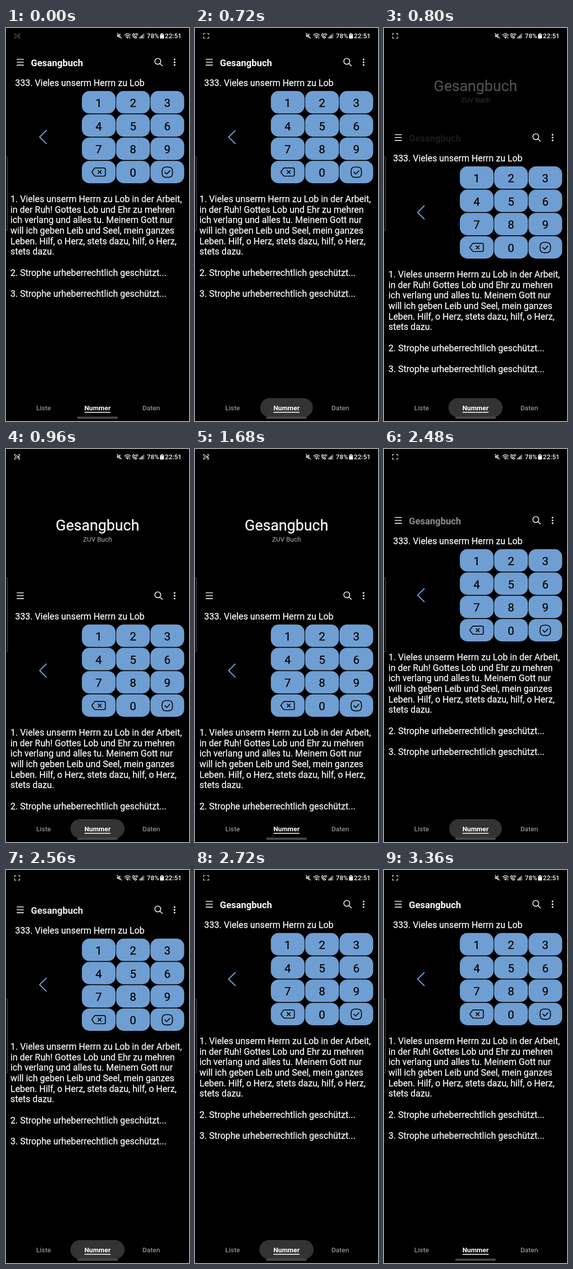
Recreate the animation shown at these times as an HTML page. Size 360 px wide and 772 px high, loop 3440 ms.

```html
<!DOCTYPE html>
<html lang="de">
<head>
<meta charset="utf-8">
<title>Gesangbuch</title>
<style>
  html, body { margin: 0; width: 100%; height: 100%; overflow: hidden; background: #000; }
  svg { display: block; width: 360px; height: 772px; font-family: Roboto, sans-serif; }
  .line { fill: none; stroke-linecap: round; stroke-linejoin: round; }
  .mid { text-anchor: middle; }
  .body { font-size: 17.62px; fill: #fafafa; stroke: #fafafa; stroke-width: .25px; }
</style>
</head>
<body>
<svg viewBox="0 0 360 772">
  <rect width="360" height="772"/>

  <g id="header" class="mid">
    <text x="180" y="160" font-size="29.5" fill="#fafafa" stroke="#fafafa" stroke-width=".3">Gesangbuch</text>
    <text x="180" y="182.300" font-size="13" fill="#9c9c9c" stroke="#9c9c9c" stroke-width=".2">ZUV Buch</text>
  </g>

  <g id="page">
    <g class="line" stroke="#f5f5f5" stroke-width="1.6">
      <path d="M21.700 61.500h12.800M21.700 67.200h12.800M21.700 72.900h12.800"/>
      <circle cx="298.600" cy="65.500" r="5.800"/>
      <path d="M302.800 69.700l4.700 4.700"/>
    </g>
    <g fill="#f5f5f5">
      <circle cx="331.600" cy="61.700" r="1.700"/>
      <circle cx="331.600" cy="67.200" r="1.700"/>
      <circle cx="331.600" cy="72.700" r="1.700"/>
    </g>
    <text id="smallTitle" x="49" y="74.500" font-size="18.300" font-weight="700" fill="#fafafa">Gesangbuch</text>
    <text class="body" x="18" y="113.600">333. Vieles unserm Herrn zu Lob</text>
    <path class="line" d="M79 201.500L66.200 214.200L79 227" stroke="#6a9fd8" stroke-width="2.200"/>
    <g id="keys"></g>
    <g class="line" stroke="#000" stroke-width="1.700">
      <path d="M176 274.800h16.500q3 0 3 3v10.200q0 3 -3 3h-16.500q-1.200 0 -2 -1l-4.600 -6.100q-.8 -1 0 -2l4.600 -6.100q.8 -1 2 -1z"/>
      <path d="M181.200 279.800l6.200 6.200M187.400 279.800l-6.200 6.200"/>
      <path d="M317.300 273c8 0 10.300 2.200 10.300 10.200s-2.300 10.200 -10.300 10.200s-10.300 -2.200 -10.300 -10.200s2.300 -10.200 10.300 -10.200z"/>
      <path d="M312.400 283.200l3.700 3.700l6.400 -6.600"/>
    </g>
    <g id="lyrics" class="body"></g>
  </g>

  <rect y="722" width="360" height="50"/>
  <rect id="pill" y="727" height="37.500" fill="#333"/>
  <rect x="140" y="763.300" width="80" height="4.400" rx="2.200" fill="#474747"/>
  <g class="mid" font-size="13.200" font-weight="500" fill="#8f8f8f">
    <text x="74" y="750.600">Liste</text>
    <text x="180" y="750.600" font-weight="700" fill="#fff">Nummer</text>
    <text x="285.700" y="750.600">Daten</text>
  </g>
  <rect x="154.300" y="754" width="51.400" height="1.700" fill="#f5f5f5"/>

  <rect x="-8" y="253" width="11" height="145.500" rx="3" fill="#050505" stroke="#5c5c5c"/>

  <g id="scan" class="line" stroke="#dcdcdc" stroke-width="1.200">
    <path d="M16.700 13.500v-2.700h3M24 10.800h3v2.700M27 17.200v2.700h-3M19.700 19.900h-3v-2.700"/>
    <path id="camera" d="M19 13.700h4.300v3.800h-4.300zM23.300 15.200l2.200 -1.300v3.400l-2.200 -1.300"/>
  </g>

  <g fill="#f0f0f0">
    <path d="M218.500 13.500h2.700l3.600 -3v10l-3.600 -3.200h-2.700z"/>
    <path class="line" d="M218.500 10.500l9 9.600" stroke="#000" stroke-width="2.400"/>
    <path class="line" d="M218.500 10.500l9 9.600" stroke="#f0f0f0" stroke-width="1.300"/>
    <g class="line" stroke="#f0f0f0" stroke-width="1.500">
      <path d="M233.300 13.700q5.700 -4.800 11.400 0M235.300 16q3.700 -3 7.400 0M237.300 18.200q1.700 -1.300 3.400 0"/>
      <path d="M249.200 12q-.8 5.500 5.800 8.200l2.300 -1.700l-2.200 -2l-1.400 .8q-1.700 -1.200 -2.100 -2.900l1.200 -1.100l-1.500 -2.500z" stroke-width="1.300"/>
      <path d="M254 12.400q2.800 -2.400 5.600 0M255.300 14.300q1.500 -1.200 3 0" stroke-width="1.300"/>
    </g>
    <circle cx="239" cy="19.500" r="1.100"/>
    <path d="M242.300 18.800l1.200 -1.600l1.200 1.600zM242.300 19.300l1.200 1.600l1.200 -1.600z"/>
    <path d="M262.500 17.400h1.700v3h-1.700zM265 15.300h1.700v5.100h-1.700zM267.500 13.100h1.700v7.300h-1.700z"/>
    <path d="M270 10.800h1.700v9.600h-1.700z" fill="#8a8a8a"/>
    <path d="M305.300 10.300h3.200v1.200h1.300q1 0 1 1v7.200q0 1 -1 1h-5.800q-1 0 -1 -1v-7.200q0 -1 1 -1h1.300z"/>
    <path d="M304 12.500h5.800v1.300h-5.800z" fill="#777"/>
    <g font-size="13" font-weight="500">
      <text x="277" y="20">78%</text>
      <text x="312.500" y="20">22:51</text>
    </g>
  </g>
</svg>
<script>
const LOOP = 3440, STEP = 80, RISE = 221;
const byId = id => document.getElementById(id);
const clamp = v => Math.max(0, Math.min(1, v));

function add(parent, tag, attrs, text) {
  const el = document.createElementNS("http://www.w3.org/2000/svg", tag);
  for (const k in attrs) el.setAttribute(k, attrs[k]);
  if (text) el.textContent = text;
  parent.append(el);
}

["1", "2", "3", "4", "5", "6", "7", "8", "9", "", "0", ""].forEach((label, i) => {
  const x = 149.2 + (i % 3) * 67.5, y = 123.8 + Math.floor(i / 3) * 45.7;
  add(byId("keys"), "rect", { x, y, width: 66.3, height: 44, rx: 15, fill: "#6f9ed2" });
  if (label) add(byId("keys"), "text", {
    x: x + 33.1, y: y + 31, "font-size": 22.5, class: "mid", stroke: "#000", "stroke-width": 0.25
  }, label);
});

[
  "1. Vieles unserm Herrn zu Lob in der Arbeit,",
  "in der Ruh! Gottes Lob und Ehr zu mehren",
  "ich verlang und alles tu. Meinem Gott nur",
  "will ich geben Leib und Seel, mein ganzes",
  "Leben. Hilf, o Herz, stets dazu, hilf, o Herz,",
  "stets dazu.",
  "",
  "2. Strophe urheberrechtlich geschützt...",
  "",
  "3. Strophe urheberrechtlich geschützt..."
].forEach((line, i) => add(byId("lyrics"), "text", { x: 8.8, y: 342 + i * 20.65 }, line));

const ease = p => 1 - Math.pow(1 - clamp(p), 2.73);
const offset = t => Math.round(RISE * (ease((t - 720) / 240) - ease((t - 2400) / 240)));

// touch highlight: grows on press, then fades
function drawPill(t) {
  const age = t - (t < 2000 ? 640 : 2400);
  const on = age >= 0 && age < 640;
  const w = 98 + 8.5 * clamp((age + 40) / 180);
  const pill = byId("pill");
  pill.setAttribute("x", 180 - w / 2);
  pill.setAttribute("width", w);
  pill.setAttribute("rx", 18.7);
  pill.setAttribute("opacity", on ? clamp((age + 50) / 130) * clamp((640 - age) / 320) : 0);
}

const cameraOn = t => [[0, 640], [880, 1240], [1680, 2240], [2800, 3360]]
  .some(([a, b]) => t >= a && t < b);

function draw(t) {
  const dy = offset(t);
  byId("page").setAttribute("transform", `translate(0 ${dy})`);
  byId("header").setAttribute("transform", `translate(0 ${(dy - RISE) / 2})`);
  byId("header").setAttribute("opacity", clamp((dy - 120) / 90));
  byId("smallTitle").setAttribute("opacity", clamp(1 - dy / 165));
  byId("scan").setAttribute("opacity", clamp(0.35 + t / 240));
  byId("camera").setAttribute("opacity", cameraOn(t) ? 1 : 0);
  drawPill(t);
}

const start = performance.now();
function tick() {
  const t = (performance.now() - start) % LOOP;
  draw(Math.floor(t / STEP) * STEP);
  requestAnimationFrame(tick);
}
tick();
</script>
</body>
</html>
```
